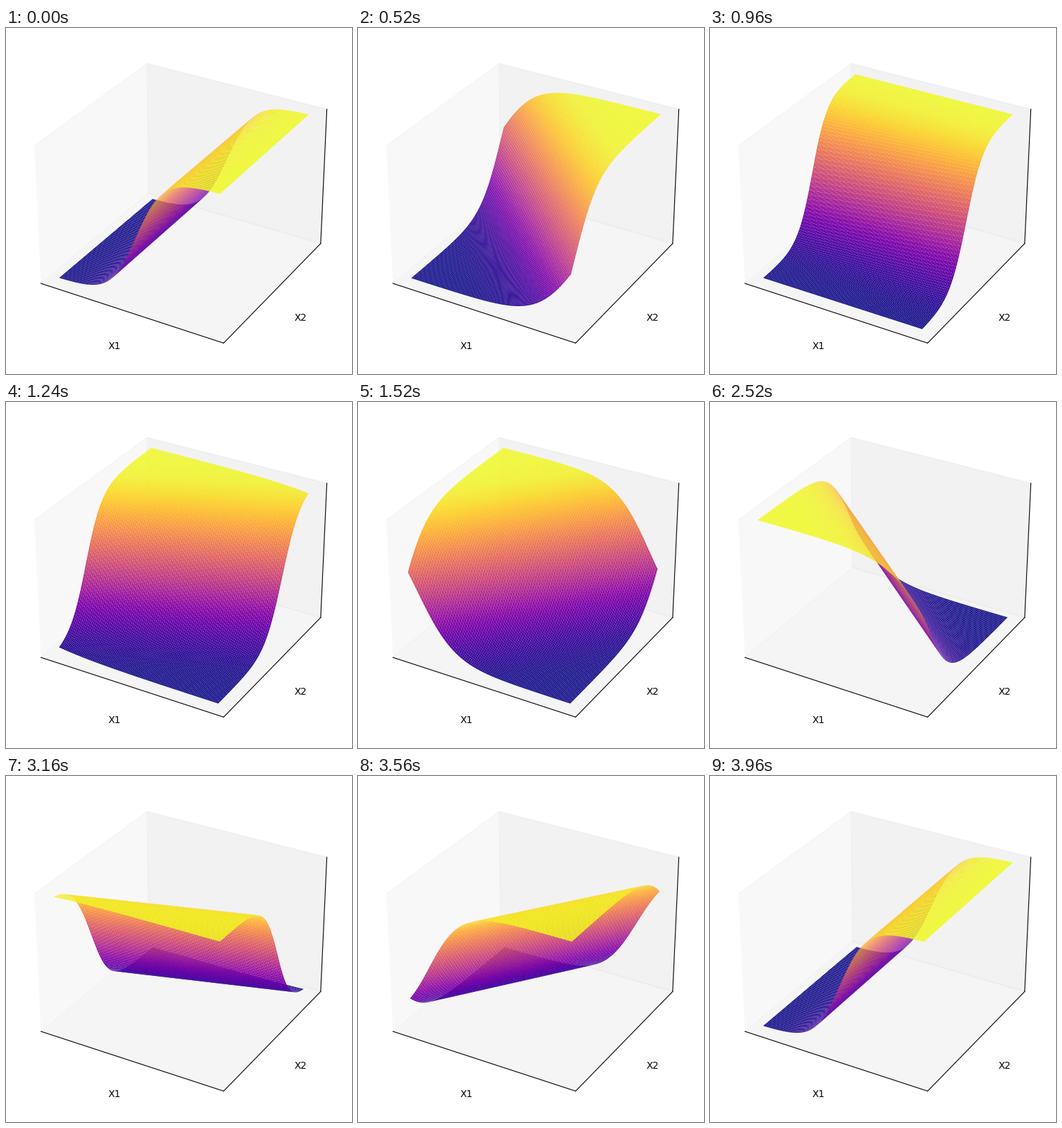
A matplotlib script for the animation above (4000 ms loop, 500 by 500 pixels).

```python
import numpy as np
import matplotlib.pyplot as plt
from matplotlib.animation import FuncAnimation
from matplotlib.collections import PolyCollection
from mpl_toolkits.mplot3d import proj3d

FRAMES = 100
STEEPNESS = 6
PAD = 1 / 48
LIMIT = 1.1 * (1 + 2 * PAD)


class Mesh(PolyCollection):
    """Grid surface whose cells are projected and depth-sorted as arrays."""

    def set_grid(self, x, y, z):
        self.corners = [cells(v) for v in (x, y, z)]
        self.heights = self.corners[2].mean(axis=1)

    def do_3d_projection(self):
        flat = [c.ravel() for c in self.corners]
        px, py, pz = proj3d.proj_transform(*flat, self.axes.M)
        depth = np.reshape(pz, (-1, 4)).mean(axis=1)
        order = np.argsort(-depth, kind="stable")
        quads = np.stack([px, py], axis=-1).reshape(-1, 4, 2)
        self.set_verts(quads[order])
        self.set_array(self.heights[order])
        self.autoscale()
        return depth.min()


def cells(v):
    """Four corner values of every grid cell, in drawing order."""
    quad = [v[:-1, :-1], v[:-1, 1:], v[1:, 1:], v[1:, :-1]]
    return np.stack(quad, axis=-1).reshape(-1, 4)


def sigmoid(t):
    return 1 / (1 + np.exp(-t))


fig = plt.figure(figsize=(5, 5), dpi=100)
ax = fig.add_axes([0.03, 0.03, 0.94, 0.94], projection="3d")
ax.set(xlim=(-LIMIT, LIMIT), ylim=(-LIMIT, LIMIT), zlim=(-PAD, 1 + PAD),
       xticks=[], yticks=[], zticks=[], xlabel="X1", ylabel="X2")

side = np.linspace(-1, 1, 100)
x1, x2 = np.meshgrid(side, side)
mesh = Mesh([], cmap="plasma", linewidth=0)
ax.add_collection(mesh, autolim=False)


def draw(i):
    """Show the sigmoid plane with its weight vector turned to step i."""
    angle = 2 * np.pi * i / (FRAMES - 1)
    z = sigmoid(STEEPNESS * (np.cos(angle) * x1 + np.sin(angle) * x2))
    mesh.set_grid(x1, x2, z)
    return [mesh]


draw(0)
anim = FuncAnimation(fig, draw, frames=FRAMES, interval=40,
                     repeat=True, repeat_delay=0)
plt.show()
```
